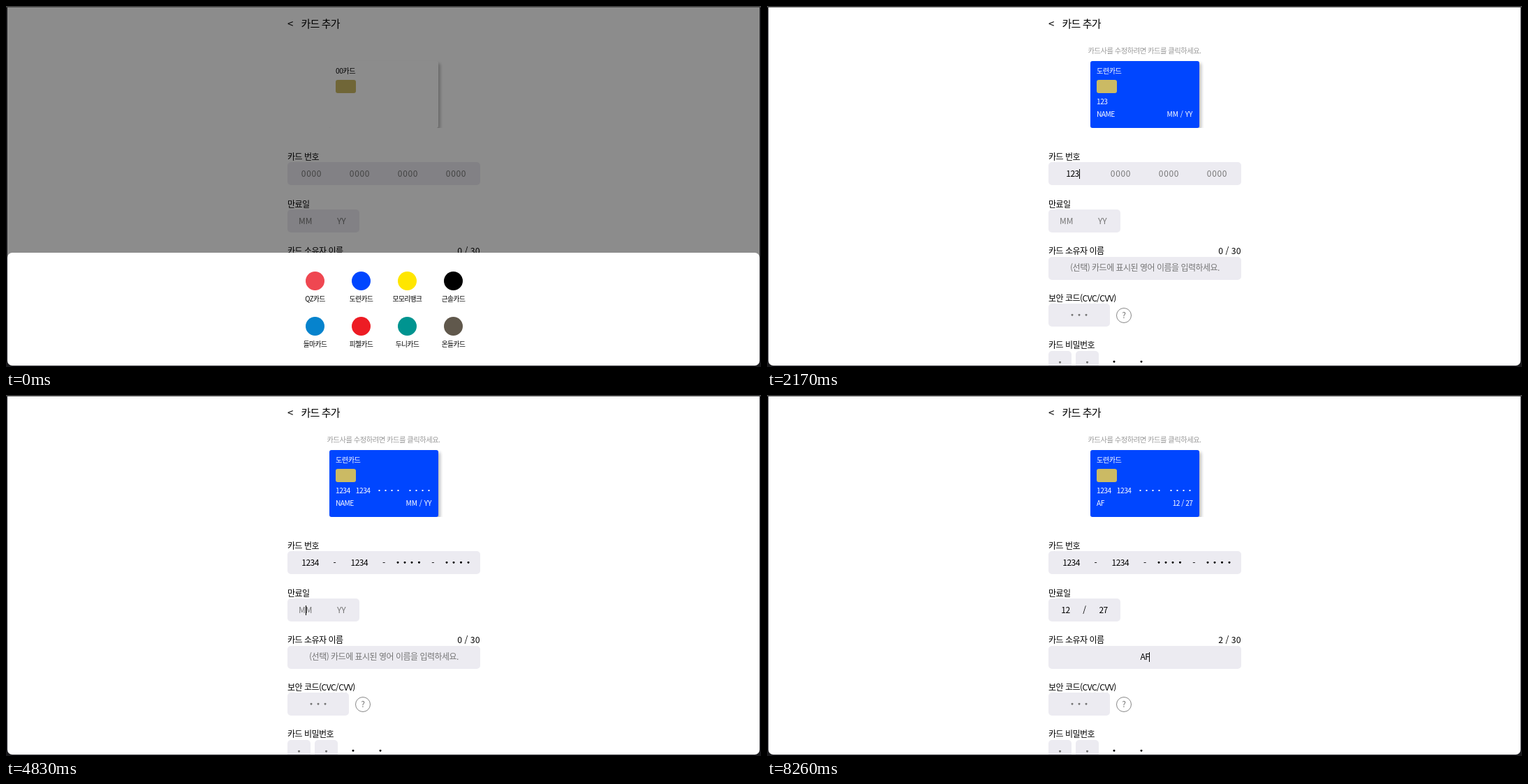
An HTML page that plays this animation: 1081 px wide and 518 px high, repeating every 8400 ms.

```html
<!DOCTYPE html>
<html lang="ko">
<head>
<meta charset="utf-8">
<title>카드 추가</title>
<style>
html, body { margin: 0; width: 100%; height: 100%; overflow: hidden; background: linear-gradient(#444 2px, #1a1a1d 2px); }
body { font: 12px "Noto Sans CJK KR", "Noto Sans KR", sans-serif; letter-spacing: -.042em; color: #000; }
#window { position: absolute; left: 2px; top: 2px; width: 1077px; height: 514px; overflow: hidden; background: #fff; border-radius: 0 0 7px 7px; }
#page { position: absolute; left: -2px; top: -2px; width: 1081px; height: 518px; }
#page > *, .card > * { position: absolute; }
.t { margin-top: -10px; line-height: 20px; white-space: nowrap; }
.title { font-size: 15px; letter-spacing: -.055em; }
.hint { left: 0; width: 1081px; text-align: center; font-size: 10.3px; color: #999; }
.error { left: 403px; font-size: 10.2px; color: #ff3b3b; }
.count { right: 402.5px; font-size: 12.3px; letter-spacing: 0; }

.box { display: flex; height: 33px; background: #ecebf1; border-radius: 5px; line-height: 33px; }
.field { flex: 1 1 0; min-width: 0; text-align: center; white-space: nowrap; }
.field span, .sep { position: relative; top: -1.5px; }
.field span { display: inline-block; height: 33px; }
.sep { flex: 0 0 5.2px; text-align: center; letter-spacing: 0; }
.ph { color: #757575; }
.ph.num { letter-spacing: .7px; }
.ph.date { letter-spacing: 0; }
.caret { position: absolute; top: 11px; left: 100%; width: 1px; height: 14px; background: #000; }
.ph .caret { left: 50%; }
.dot { display: inline-block; width: 10.3px; height: 33px; vertical-align: top; background: radial-gradient(circle at 50% 17.2px, currentColor 1.2px, transparent 1.8px); }
.grey { color: #777; }
.pin { width: 33px; }
.pin .dot { margin: -1.5px auto 0; }
.help { left: 500px; top: 432.5px; width: 20px; height: 20px; border: 1px solid #888; border-radius: 50%; text-align: center; line-height: 18px; color: #777; letter-spacing: 0; }

.card { left: 463px; top: 78.5px; width: 155.5px; height: 96.5px; border-radius: 3px; background: #fff; box-shadow: 3px 3px 4px rgba(0, 0, 0, .25); clip-path: inset(-1px -8px 0 -1px); font-size: 10.2px; }
.card.blue { background: #0046ff; color: #fff; }
.card .t { left: 9px; }
.card .date { left: auto; right: 9px; }
.card .date.wide { letter-spacing: 0; }
.chip { left: 8.5px; top: 27px; width: 29.5px; height: 19.5px; border-radius: 3px; background: #cbba64; }
.digits { top: 58px; width: 138px; display: flex; justify-content: space-between; }
.digits .dot { width: 9px; height: 20px; background: radial-gradient(circle at 50% 10px, currentColor .8px, transparent 1.4px); }

.shade { inset: 0; background: rgba(0, 0, 0, .45); }
.sheet { left: 2px; top: 353.5px; width: 1077px; height: 162.5px; border-radius: 7px; background: #fff; }
.bank { position: absolute; width: 66px; text-align: center; font-size: 9.7px; line-height: 20px; }
.bank b { display: block; width: 27px; height: 27px; margin: 0 auto 2px; border-radius: 50%; }
#pointer { left: 0; top: 0; }
</style>
</head>
<body>
<div id="window"><div id="page">
  <div class="t title" style="left:403px;top:24.5px">&lt;</div>
  <div class="t title" style="left:422.5px;top:24.5px">카드 추가</div>
  <div class="t hint" id="hint" style="top:63.5px">카드사를 수정하려면 카드를 클릭하세요.</div>

  <div class="card" id="card">
    <div class="t" id="brand" style="top:14.5px"></div>
    <div class="chip"></div>
    <div class="t digits" id="digits"></div>
    <div class="t" id="owner"></div>
    <div class="t date" id="date"></div>
  </div>

  <div class="t" style="left:403px;top:216px">카드 번호</div>
  <div class="box" id="number" style="left:403px;top:224.3px;width:276px"></div>
  <div class="t" style="left:403px;top:283.5px">만료일</div>
  <div class="box" id="expiry" style="left:403px;top:292px;width:103px"></div>
  <div class="t" style="left:403px;top:351px">카드 소유자 이름</div>
  <div class="t count" id="count" style="top:351px"></div>
  <div class="box" id="name" style="left:403px;top:359.5px;width:276px"></div>
  <div class="t error" id="error"></div>

  <div class="t" style="left:403px;top:418.5px">보안 코드(CVC/CVV)</div>
  <div class="box" style="left:403px;top:427px;width:88px"><div class="field grey"><span><i class="dot"></i><i class="dot"></i><i class="dot"></i></span></div></div>
  <div class="help">?</div>
  <div class="t" style="left:403px;top:486px">카드 비밀번호</div>
  <div class="box pin" style="left:403px;top:495px"><i class="dot grey"></i></div>
  <div class="box pin" style="left:442px;top:495px"><i class="dot grey"></i></div>
  <i class="dot" style="left:492px;top:493px"></i>
  <i class="dot" style="left:531px;top:493px"></i>

  <div class="shade" id="shade"></div>
  <div class="sheet" id="sheet"></div>
  <svg id="pointer" width="1081" height="518">
    <circle id="ring" cx="510.3" cy="398.5" r="21.2" fill="none" stroke="#000" stroke-width="2.2"/>
    <path id="arrow" d="M0 0V11.3L2.6 9L4.4 13L6.3 12.1L4.6 8.3H8Z" fill="#000" stroke="#fff" stroke-width=".8"/>
    <path id="hand" d="M-1 1.2Q0 -.4 1.1 1.2V5Q2.6 4.2 3.3 5.4Q4.8 4.8 5.3 6Q7 5.8 7 7.5V10L5.8 13H.2L-3.2 8.6Q-3.6 6.8-1 8Z" fill="#fff" stroke="#000" stroke-width="1"/>
  </svg>
</div></div>

<script>
const LOOP = 8400, TICK = 70;
const $ = id => document.getElementById(id);

const banks = [
  ['QZ카드', '#ef4751'], ['도련카드', '#0046ff'], ['모모리뱅크', '#ffe600'], ['근솔카드', '#000'],
  ['들마카드', '#0683cd'], ['피첼카드', '#ed1c24'], ['두니카드', '#009490'], ['온들카드', '#60584c']
];
$('sheet').innerHTML = banks.map(([label, color], i) =>
  `<div class="bank" style="left:${407.5 + i % 4 * 66}px;top:${27.5 + (i >> 2) * 64.5}px"><b style="background:${color}"></b>${label}</div>`).join('');

const errors = [
  ['카드 번호는 숫자만 입력 가능합니다.', 266.5],
  ['카드 만료일은 두 자리 숫자로만 입력 가능합니다.', 334],
  ['카드 소유자 이름은 띄어쓰기와 영어 대문자만 입력 가능합니다.', 402]
];

// Each step changes part of the form; focus 0-3 number, 4-5 expiry, 6 name
const steps = [
  [0, { open: true, focus: -1, error: -1, v: ['', '', '', '', '', '', ''] }],
  [1190, { open: false, focus: 0 }],
  [1890, '1'], [2030, '12'], [2170, '123'], [2310, '1234', 1],
  [2450, '1'], [2590, '12'], [2730, '123'], [2870, '1234', 2],
  [3150, { error: 0 }],
  [3780, '1'], [3920, '123'], [4130, '1234', 3],
  [4410, '1'], [4550, '12'], [4690, '123'], [4830, '1234', 4],
  [5180, '1'], [5250, '12', 5],
  [5530, { error: 1 }],
  [6300, '2'], [6580, '27', 6],
  [7140, { focus: -1, error: 2 }], [7280, { focus: 6 }],
  [8050, 'A'], [8260, 'AF']
];

const states = [];
for (const [at, change, next] of steps) {
  const s = { ...states[states.length - 1] };
  if (typeof change === 'string') {
    s.v = s.v.map((old, i) => i === s.focus ? change : old);
    s.error = -1;
    if (next) s.focus = next;
  } else Object.assign(s, change);
  s.at = at;
  states.push(s);
}

const mask = (v, i) => i === 2 || i === 3 ? '<i class="dot"></i>'.repeat(v.length) : v;

function field(s, i, hint, kind) {
  const v = s.v[i], caret = s.focus === i ? '<i class="caret"></i>' : '';
  return `<div class="field"><span class="${v ? '' : 'ph ' + kind}">${v ? mask(v, i) : hint}${caret}</span></div>`;
}
const sep = (show, c) => show ? `<div class="sep">${c}</div>` : '';

function render(s) {
  const { v, open } = s, numbers = v.slice(0, 4);
  for (const id of ['shade', 'sheet']) $(id).style.display = open ? '' : 'none';
  $('hint').style.display = open ? 'none' : '';
  $('card').className = open ? 'card' : 'card blue';
  $('brand').textContent = open ? '00카드' : banks[1][0];
  $('digits').innerHTML = numbers.map((n, i) => `<span>${mask(n, i)}</span>`).join('');
  $('owner').textContent = open ? '' : v[6] || 'NAME';
  $('date').textContent = open ? '' : `${v[4] || 'MM'} / ${v[5] || 'YY'}`;
  $('date').className = v[5] ? 't date' : 't date wide';
  $('owner').style.top = $('date').style.top = v[0] ? '76px' : '63.5px';
  $('number').innerHTML = numbers.map((n, i) =>
    field(s, i, '0000', 'num') + sep(i < 3 && n.length === 4, '-')).join('');
  $('expiry').innerHTML = field(s, 4, 'MM', 'date') + sep(v[4].length === 2, '/') + field(s, 5, 'YY', 'date');
  $('name').innerHTML = field(s, 6, '(선택) 카드에 표시된 영어 이름을 입력하세요.', '');
  $('count').textContent = `${v[6].length} / 30`;
  const [text, top] = errors[s.error] || ['', 0];
  $('error').textContent = text;
  $('error').style.top = top + 'px';
}

function movePointer(t) {
  const p = Math.min(1, Math.max(0, (t - TICK) / 910));
  const left = (1 - p) ** 3;
  const x = 510.5 + 32 * left, y = 398.5 + 116 * left;
  const over = t < 1190 && Math.hypot(x - 508.5, y - 394.5) < 13.5;
  const shown = t >= TICK && t < 1750;
  const place = (id, on) => {
    $(id).style.display = on ? '' : 'none';
    $(id).setAttribute('transform', `translate(${x} ${y})`);
  };
  place('arrow', shown && !over);
  place('hand', shown && over);
  $('ring').style.display = t >= 1120 && t < 1190 ? '' : 'none';
}

let current;
function frame() {
  const t = Math.floor(performance.now() % LOOP / TICK) * TICK;
  const s = states.filter(s => s.at <= t).pop();
  if (s !== current) render(current = s);
  movePointer(t);
  requestAnimationFrame(frame);
}
frame();
</script>
</body>
</html>
```
